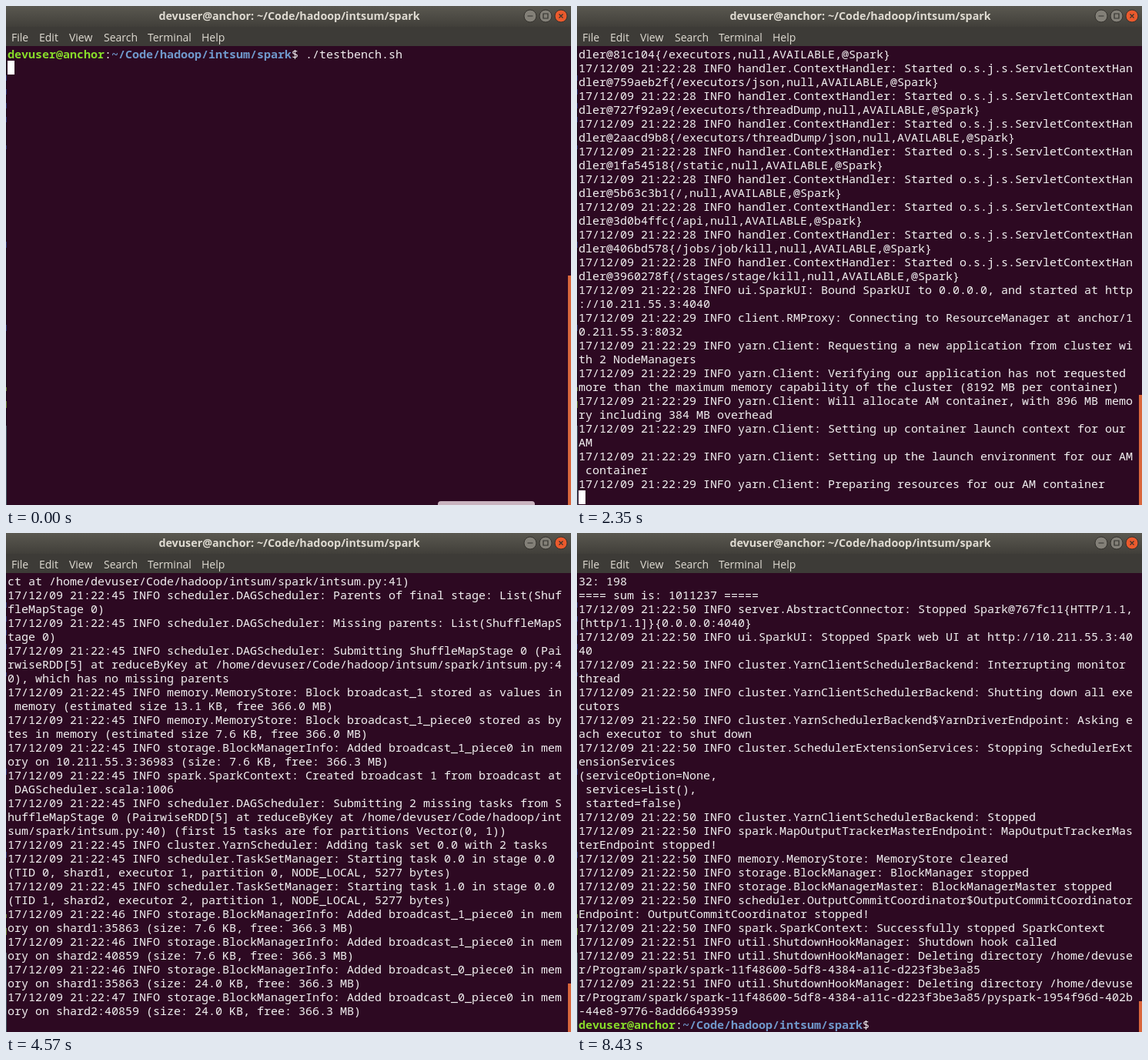
Write an HTML page that moves like this. It is 734x648 px and loops after 8790 ms.

```html
<!DOCTYPE html>
<html lang="en">
<head>
<meta charset="utf-8">
<title>Terminal</title>
<style>
html, body { margin: 0; width: 100%; height: 100%; overflow: hidden; background: #2d0922; }
svg { display: block; }
text { white-space: pre; }
.ui { font: 14px "Open Sans", "Noto Sans", sans-serif; fill: #dfdbd2; }
.title { font-weight: 700; font-size: 14.3px; text-anchor: middle; }
#rows { font: 15px "Noto Sans Mono", monospace; fill: #f2f0f1; }
.who { fill: #87dc2a; font-weight: 700; }
.dir { fill: #7099cc; font-weight: 700; }
</style>
</head>
<body>
<svg width="734" height="648" viewBox="0 0 734 648">
  <defs>
    <linearGradient id="bar" x2="0" y2="1">
      <stop offset="0" stop-color="#5a5850"/>
      <stop offset="1" stop-color="#403e39"/>
    </linearGradient>
  </defs>
  <rect width="734" height="648" fill="#2d0922"/>
  <path d="M.5 52V545" stroke="#1b0a1c"/>
  <path d="M.5 90v7M.5 108v7M.5 126v7M.5 144v7M.5 181v5M.5 306v8M.5 414v8" stroke="#27306e"/>
  <path d="M.5 495v5M.5 513v9" stroke="#5f7a2c"/>
  <path d="M.5 545V648" stroke="#40545f"/>
  <rect width="734" height="28" fill="url(#bar)"/>
  <rect y="27" width="734" height="25" fill="#3d3b37"/>
  <text class="ui title" x="368" y="18">devuser@anchor: ~/Code/hadoop/intsum/spark</text>
  <g class="ui">
    <text x="7" y="46">File</text><text x="43" y="46">Edit</text><text x="82" y="46">View</text>
    <text x="127" y="46">Search</text><text x="184" y="46">Terminal</text><text x="254" y="46">Help</text>
  </g>
  <g stroke="#33312d" fill="#838078">
    <circle cx="681" cy="13" r="8"/><circle cx="701" cy="13" r="8"/><circle cx="721" cy="13" r="8" fill="#ea5a2d"/>
    <path d="M677.5 13h7M698 10h6v6h-6zM718.5 10.5l5 5m0-5l-5 5" fill="none" stroke-width="1.2"/>
  </g>
  <rect id="cursor" width="9" height="18" fill="#fff"/>
  <g id="rows"></g>
  <rect id="thumb" x="730" width="4" fill="#d9663c"/>
  <rect id="tip" x="561" y="643" width="126" height="12" rx="4" fill="#c9b3bf"/>
</svg>
<script>
const LOOP = 8790, COLS = 80, ROWS = 33, CW = 9, LH = 18, TOP = 53;
const WHO = 'devuser@anchor', DIR = '~/Code/hadoop/intsum/spark', PROMPT = `${WHO}:${DIR}$ `;
const PY = '/home/devuser/Code/hadoop/intsum/spark/intsum.py';
const APP = 'application_1512872313403_0028';
const STAGING = `hdfs://anchor:9000/user/devuser/.sparkStaging/${APP}`;

// "27|msg" is a log entry at second 27, "28@id path" a started handler, "--" ends a burst
const LOG = `${PROMPT}./testbench.sh
--
27|spark.SparkContext: Running Spark version 2.2.0
--
27|spark.SparkContext: Submitted application: PythonIntSum
--
27|spark.SecurityManager: Changing view acls to: devuser
27|spark.SecurityManager: Changing modify acls to: devuser
27|spark.SecurityManager: Changing view acls groups to:
27|spark.SecurityManager: Changing modify acls groups to:
27|spark.SecurityManager: SecurityManager: authentication disabled; ui acls disabled; users  with view permissions: Set(devuser); groups with view permissions: Set(); users  with modify permissions: Set(devuser); groups with modify permissions: Set()
--
27|util.Utils: Successfully started service 'sparkDriver' on port 40985.
27|spark.SparkEnv: Registering MapOutputTracker
27|spark.SparkEnv: Registering BlockManagerMaster
27|storage.BlockManagerMasterEndpoint: Using org.apache.spark.storage.DefaultTopologyMapper for getting topology information
27|storage.BlockManagerMasterEndpoint: BlockManagerMasterEndpoint up
--
27|storage.DiskBlockManager: Created local directory at /home/devuser/Program/spark/blockmgr-3c1f
27|memory.MemoryStore: MemoryStore started with capacity 366.3 MB
27|spark.SparkEnv: Registering OutputCommitCoordinator
28|util.log: Logging initialized @2063ms
28|server.Server: jetty-9.3.z-SNAPSHOT
28|server.Server: Started @2146ms
28|server.AbstractConnector: Started Spark@767fc11{HTTP/1.1,[http/1.1]}{0.0.0.0:4040}
28|util.Utils: Successfully started service 'SparkUI' on port 4040.
--
28@5ab1f0c2 /jobs
28@1d80e67b /jobs/json
28@42c7d19e /jobs/job
28@6e03b5a4 /jobs/job/json
28@2f94c8d1 /stages
--
28@70d2ae36 /stages/json
28@13b8f75c /stages/stage
28@4c65e20a /stages/stage/json
28@59f1d3b7 /stages/pool
28@37a0c4e8 /stages/pool/json
28@7341a27c /storage
28@734ba96d /storage/json
--
28@6f2075e2 /storage/rdd
28@3540c56e /storage/rdd/json
28@2be29d53 /environment
28@738262bf /environment/json
28@81c104 /executors
28@759aeb2f /executors/json
28@727f92a9 /executors/threadDump
28@2aacd9b8 /executors/threadDump/json
28@1fa54518 /static
28@5b63c3b1 /
28@3d0b4ffc /api
28@406bd578 /jobs/job/kill
28@3960278f /stages/stage/kill
28|ui.SparkUI: Bound SparkUI to 0.0.0.0, and started at http://10.211.55.3:4040
--
29|client.RMProxy: Connecting to ResourceManager at anchor/10.211.55.3:8032
29|yarn.Client: Requesting a new application from cluster with 2 NodeManagers
29|yarn.Client: Verifying our application has not requested more than the maximum memory capability of the cluster (8192 MB per container)
29|yarn.Client: Will allocate AM container, with 896 MB memory including 384 MB overhead
29|yarn.Client: Setting up container launch context for our AM
29|yarn.Client: Setting up the launch environment for our AM container
29|yarn.Client: Preparing resources for our AM container
--
31|yarn.Client: Uploading resource file:/home/devuser/Program/spark/__spark_libs__.zip -> ${STAGING}/__spark_libs__.zip
33|yarn.Client: Uploading resource file:/home/devuser/Program/spark/python/lib/pyspark.zip -> ${STAGING}/pyspark.zip
33|yarn.Client: Uploading resource file:/home/devuser/Program/spark/python/lib/py4j-0.10.4-src.zip -> ${STAGING}/py4j-0.10.4-src.zip
34|spark.SecurityManager: Changing view acls to: devuser
34|spark.SecurityManager: Changing modify acls to: devuser
34|spark.SecurityManager: Changing view acls groups to:
34|spark.SecurityManager: Changing modify acls groups to:
34|yarn.Client: Submitting application ${APP} to ResourceManager
34|impl.YarnClientImpl: Submitted application ${APP}
34|cluster.SchedulerExtensionServices: Starting Yarn extension services with app ${APP} and attemptId None
35|yarn.Client: Application report for ${APP} (state: ACCEPTED)
36|yarn.Client: Application report for ${APP} (state: ACCEPTED)
37|yarn.Client: Application report for ${APP} (state: ACCEPTED)
38|yarn.Client: Application report for ${APP} (state: ACCEPTED)
--
39|ui.JettyUtils: Adding filter: org.apache.hadoop.yarn.server.webproxy.amfilter.AmIpFilter
39|yarn.Client: Application report for ${APP} (state: RUNNING)
39|yarn.Client:
         client token: N/A
         diagnostics: N/A
         ApplicationMaster host: 10.211.55.7
         ApplicationMaster RPC port: 0
         queue: default
         start time: 1512876154137
         final status: UNDEFINED
         tracking URL: http://anchor:8088/proxy/${APP}/
         user: devuser
39|cluster.YarnClientSchedulerBackend: Application ${APP} has started running.
39|util.Utils: Successfully started service 'org.apache.spark.network.netty.NettyBlockTransferService' on port 36983.
39|netty.NettyBlockTransferService: Server created on 10.211.55.3:36983
39|storage.BlockManager: Using org.apache.spark.storage.RandomBlockReplicationPolicy for block replication policy
39|storage.BlockManagerMaster: Registering BlockManager BlockManagerId(driver, 10.211.55.3, 36983, None)
39|storage.BlockManagerMasterEndpoint: Registering block manager 10.211.55.3:36983 with 366.3 MB RAM, BlockManagerId(driver, 10.211.55.3, 36983, None)
39|storage.BlockManagerMaster: Registered BlockManager BlockManagerId(driver, 10.211.55.3, 36983, None)
39|storage.BlockManager: Initialized BlockManager: BlockManagerId(driver, 10.211.55.3, 36983, None)
39@596b9f4a /metrics/json
--
42|cluster.YarnSchedulerBackend$YarnDriverEndpoint: Registered executor NettyRpcEndpointRef(null) (10.211.55.7:48772) with ID 1
42|storage.BlockManagerMasterEndpoint: Registering block manager shard1:35863 with 366.3 MB RAM, BlockManagerId(1, shard1, 35863, None)
43|cluster.YarnSchedulerBackend$YarnDriverEndpoint: Registered executor NettyRpcEndpointRef(null) (10.211.55.8:51920) with ID 2
43|storage.BlockManagerMasterEndpoint: Registering block manager shard2:40859 with 366.3 MB RAM, BlockManagerId(2, shard2, 40859, None)
43|cluster.YarnClientSchedulerBackend: SchedulerBackend is ready for scheduling beginning after reached minRegisteredResourcesRatio: 0.8
--
44|memory.MemoryStore: Block broadcast_0 stored as values in memory (estimated size 285.3 KB, free 366.0 MB)
44|memory.MemoryStore: Block broadcast_0_piece0 stored as bytes in memory (estimated size 24.0 KB, free 366.0 MB)
44|storage.BlockManagerInfo: Added broadcast_0_piece0 in memory on 10.211.55.3:36983 (size: 24.0 KB, free: 366.3 MB)
44|spark.SparkContext: Created broadcast 0 from textFile at NativeMethodAccessorImpl.java:0
44|mapred.FileInputFormat: Total input paths to process : 1
45|spark.SparkContext: Starting job: collect at ${PY}:41
45|scheduler.DAGScheduler: Registering RDD 5 (reduceByKey at ${PY}:40)
--
45|scheduler.DAGScheduler: Got job 0 (collect at ${PY}:41) with 2 output partitions
45|scheduler.DAGScheduler: Final stage: ResultStage 1 (collect at ${PY}:41)
45|scheduler.DAGScheduler: Parents of final stage: List(ShuffleMapStage 0)
45|scheduler.DAGScheduler: Missing parents: List(ShuffleMapStage 0)
45|scheduler.DAGScheduler: Submitting ShuffleMapStage 0 (PairwiseRDD[5] at reduceByKey at ${PY}:40), which has no missing parents
45|memory.MemoryStore: Block broadcast_1 stored as values in memory (estimated size 13.1 KB, free 366.0 MB)
45|memory.MemoryStore: Block broadcast_1_piece0 stored as bytes in memory (estimated size 7.6 KB, free 366.0 MB)
45|storage.BlockManagerInfo: Added broadcast_1_piece0 in memory on 10.211.55.3:36983 (size: 7.6 KB, free: 366.3 MB)
45|spark.SparkContext: Created broadcast 1 from broadcast at DAGScheduler.scala:1006
45|scheduler.DAGScheduler: Submitting 2 missing tasks from ShuffleMapStage 0 (PairwiseRDD[5] at reduceByKey at ${PY}:40) (first 15 tasks are for partitions Vector(0, 1))
45|cluster.YarnScheduler: Adding task set 0.0 with 2 tasks
45|scheduler.TaskSetManager: Starting task 0.0 in stage 0.0 (TID 0, shard1, executor 1, partition 0, NODE_LOCAL, 5277 bytes)
45|scheduler.TaskSetManager: Starting task 1.0 in stage 0.0 (TID 1, shard2, executor 2, partition 1, NODE_LOCAL, 5277 bytes)
46|storage.BlockManagerInfo: Added broadcast_1_piece0 in memory on shard1:35863 (size: 7.6 KB, free: 366.3 MB)
46|storage.BlockManagerInfo: Added broadcast_1_piece0 in memory on shard2:40859 (size: 7.6 KB, free: 366.3 MB)
46|storage.BlockManagerInfo: Added broadcast_0_piece0 in memory on shard1:35863 (size: 24.0 KB, free: 366.3 MB)
--
47|storage.BlockManagerInfo: Added broadcast_0_piece0 in memory on shard2:40859 (size: 24.0 KB, free: 366.3 MB)
--
48|scheduler.TaskSetManager: Finished task 0.0 in stage 0.0 (TID 0) in 2678 ms on shard1 (executor 1) (1/2)
--
49|scheduler.TaskSetManager: Finished task 1.0 in stage 0.0 (TID 1) in 3254 ms on shard2 (executor 2) (2/2)
49|cluster.YarnScheduler: Removed TaskSet 0.0, whose tasks have all completed, from pool
49|scheduler.DAGScheduler: ShuffleMapStage 0 (reduceByKey at ${PY}:40) finished in 3.275 s
49|scheduler.DAGScheduler: looking for newly runnable stages
49|scheduler.DAGScheduler: running: Set()
49|scheduler.DAGScheduler: waiting: Set(ResultStage 1)
49|scheduler.DAGScheduler: failed: Set()
49|scheduler.DAGScheduler: Submitting ResultStage 1 (PythonRDD[8] at collect at ${PY}:41), which has no missing parents
49|memory.MemoryStore: Block broadcast_2 stored as values in memory (estimated size 7.1 KB, free 366.0 MB)
49|cluster.YarnScheduler: Adding task set 1.0 with 2 tasks
--
32: 198
==== sum is: 1011237 =====
50|server.AbstractConnector: Stopped Spark@767fc11{HTTP/1.1,[http/1.1]}{0.0.0.0:4040}
50|ui.SparkUI: Stopped Spark web UI at http://10.211.55.3:4040
50|cluster.YarnClientSchedulerBackend: Interrupting monitor thread
50|cluster.YarnClientSchedulerBackend: Shutting down all executors
50|cluster.YarnSchedulerBackend$YarnDriverEndpoint: Asking each executor to shut down
50|cluster.SchedulerExtensionServices: Stopping SchedulerExtensionServices
(serviceOption=None,
 services=List(),
 started=false)
50|cluster.YarnClientSchedulerBackend: Stopped
50|spark.MapOutputTrackerMasterEndpoint: MapOutputTrackerMasterEndpoint stopped!
50|memory.MemoryStore: MemoryStore cleared
50|storage.BlockManager: BlockManager stopped
50|storage.BlockManagerMaster: BlockManagerMaster stopped
50|scheduler.OutputCommitCoordinator$OutputCommitCoordinatorEndpoint: OutputCommitCoordinator stopped!
50|spark.SparkContext: Successfully stopped SparkContext
51|util.ShutdownHookManager: Shutdown hook called
51|util.ShutdownHookManager: Deleting directory /home/devuser/Program/spark/spark-11f48600-5df8-4384-a11c-d223f3be3a85
51|util.ShutdownHookManager: Deleting directory /home/devuser/Program/spark/spark-11f48600-5df8-4384-a11c-d223f3be3a85/pyspark-1954f96d-402b-44e8-9776-8add66493959
${PROMPT}`;

// time, bursts printed, cursor shown, top of the scrollbar thumb
const STEPS = [
  [0, 0, 1, 350], [290, 1, 1, 350], [580, 2, 1, 350], [730, 3, 1, 350],
  [1030, 4, 1, 350], [1180, 5, 1, 350], [1330, 6, 1, 393], [1470, 7, 1, 434],
  [1620, 8, 0, 480], [1920, 8, 1, 480], [2350, 9, 1, 505], [2650, 10, 0, 540],
  [2800, 11, 0, 558], [3100, 12, 0, 564], [3250, 13, 1, 574], [3830, 14, 1, 585],
  [4120, 15, 1, 585], [4570, 15, 0, 585], [5170, 16, 0, 585.5], [5300, 17, 0, 591],
  [5450, 18, 1, 608], [6040, 18, 0, 608], [6640, 18, 1, 608], [7230, 18, 0, 608],
  [7830, 18, 1, 608], [8430, 18, 0, 608]
];

const expand = s => s
  .replace(/^(\d\d)@(\w+) (.*)$/, '$1|handler.ContextHandler: Started o.s.j.s.ServletContextHandler@$2{$3,null,AVAILABLE,@Spark}')
  .replace(/^(\d\d)\|/, '17/12/09 21:22:$1 INFO ');

const lines = [], ends = [];
for (const burst of LOG.split('\n--\n')) {
  for (const s of burst.split('\n')) lines.push(...expand(s).match(new RegExp(`.{1,${COLS}}`, 'g')));
  ends.push(lines.length);
}

const $ = id => document.getElementById(id);
const make = (tag, parent, attrs) => {
  const el = document.createElementNS('http://www.w3.org/2000/svg', tag);
  for (const k in attrs) el.setAttribute(k, attrs[k]);
  return parent.appendChild(el);
};
const rows = Array.from({ length: ROWS }, (_, i) => make('text', $('rows'), { x: 2, y: TOP + 15 + i * LH }));

function write(el, s) {
  el.textContent = '';
  if (!s.startsWith(WHO)) { el.textContent = s; return; }
  make('tspan', el, { class: 'who' }).textContent = WHO;
  el.append(':');
  make('tspan', el, { class: 'dir' }).textContent = DIR;
  el.append(s.slice(WHO.length + 1 + DIR.length));
}

let shown = -1;
function draw(t) {
  const [, burst, cursor, thumb] = STEPS.filter(s => s[0] <= t).pop();
  const end = ends[burst], atPrompt = burst === ends.length - 1;
  const curLine = atPrompt ? end - 1 : end;
  const first = Math.max(0, curLine - ROWS + 1);
  if (burst !== shown) {
    rows.forEach((el, i) => write(el, first + i < end ? lines[first + i] : ''));
    shown = burst;
  }
  $('cursor').setAttribute('x', 2 + (atPrompt ? PROMPT.length * CW : 0));
  $('cursor').setAttribute('y', TOP + (curLine - first) * LH);
  $('cursor').setAttribute('opacity', cursor);
  $('thumb').setAttribute('y', thumb);
  $('thumb').setAttribute('height', 648 - thumb);
  $('tip').setAttribute('opacity', t < 140 ? 1 : 0);
}

const start = performance.now();
function tick() {
  draw((performance.now() - start) % LOOP);
  requestAnimationFrame(tick);
}
tick();
</script>
</body>
</html>
```
